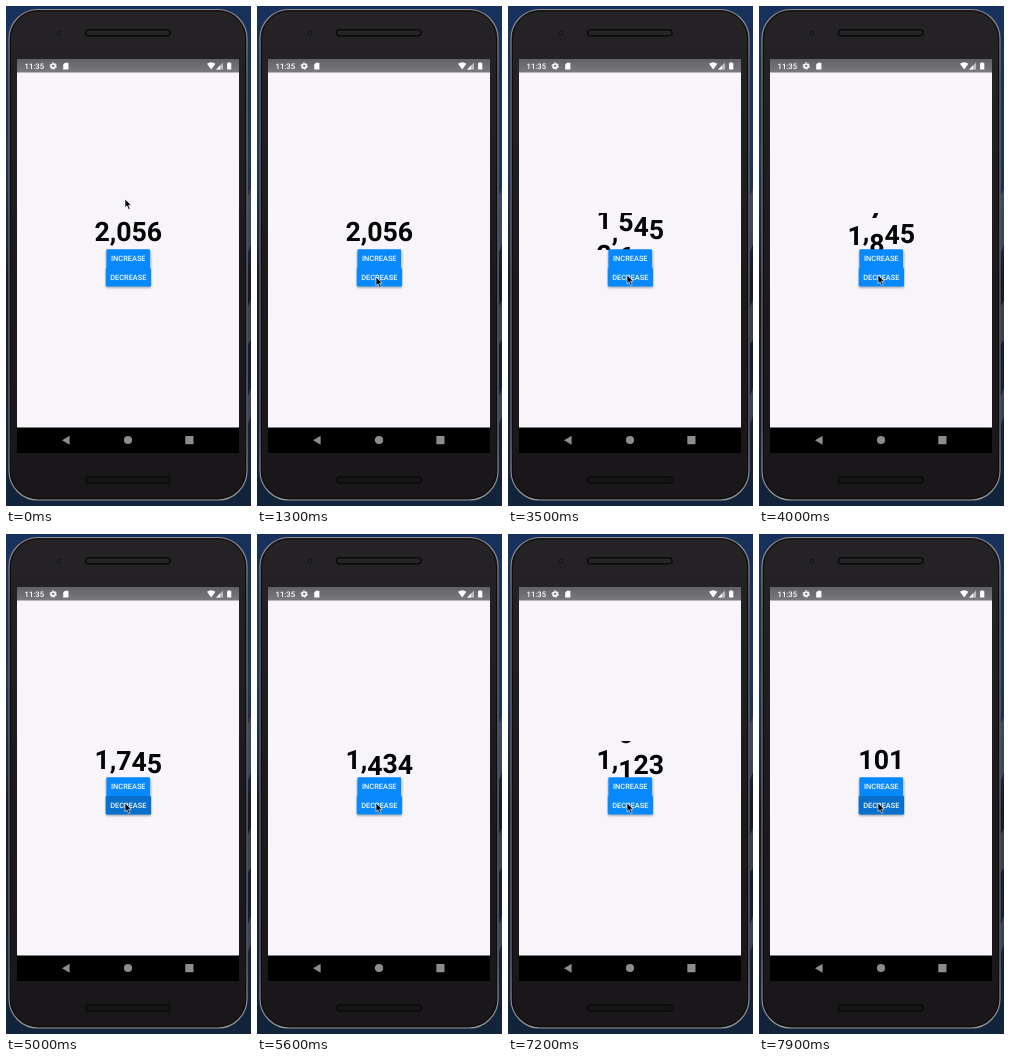
Recreate the animation shown at these times as an HTML page. Size 245 by 500 pixels, loop 8 s.

```html
<!DOCTYPE html>
<html lang="en">
<head>
<meta charset="utf-8">
<title>Animated number</title>
<style>
  html, body { margin: 0; width: 100%; height: 100%; overflow: hidden; background: #142a50; }
  svg { display: block; width: 100%; height: 100%; }
  text { font-family: Roboto, Arial, sans-serif; text-rendering: geometricPrecision; }
  .digits { font-size: 26.7px; font-weight: 700; text-anchor: middle; fill: #050505; }
  .label { font-size: 7.4px; font-weight: 500; text-anchor: middle; fill: #f4faff; }
</style>
</head>
<body>
<svg viewBox="0 0 245 500" preserveAspectRatio="none">
  <defs>
    <linearGradient id="wall" x2="0" y2="1">
      <stop offset="0" stop-color="#17305c"/>
      <stop offset=".3" stop-color="#1c355f"/>
      <stop offset=".48" stop-color="#18263f"/>
      <stop offset=".55" stop-color="#141a26"/>
      <stop offset=".8" stop-color="#14213a"/>
      <stop offset="1" stop-color="#12233c"/>
    </linearGradient>
    <linearGradient id="body" x2="0" y2="1">
      <stop offset="0" stop-color="#252326"/>
      <stop offset=".5" stop-color="#1c1a1c"/>
      <stop offset="1" stop-color="#191719"/>
    </linearGradient>
    <linearGradient id="rim" x2="0" y2="1">
      <stop offset="0" stop-color="#8e8c8c"/>
      <stop offset=".15" stop-color="#6e6c6c"/>
      <stop offset=".85" stop-color="#6e6c6c"/>
      <stop offset="1" stop-color="#9a9896"/>
    </linearGradient>
    <linearGradient id="bar" x2="0" y2="1">
      <stop offset="0" stop-color="#626164"/>
      <stop offset="1" stop-color="#7b797d"/>
    </linearGradient>
    <clipPath id="window"><rect x="80" y="207" width="85" height="37"/></clipPath>
    <filter id="soft" x="-20%" y="-30%" width="140%" height="180%"><feGaussianBlur stdDeviation="1"/></filter>
  </defs>

  <rect width="245" height="500" fill="url(#wall)"/>
  <path d="M242 190l3-8v56l-3 8zM242 300l3-6v40l-3 4zM242 390l3-8v28l-3 8z" fill="#5b6574" opacity=".5"/>

  <rect x="3" y="3.5" width="238" height="490.5" rx="29" fill="url(#body)" stroke="url(#rim)" stroke-width="1.2"/>
  <rect x="4.5" y="5" width="235" height="487.5" rx="27.5" fill="none" stroke="#0e0d0e"/>
  <g stroke="#0a0a0b" stroke-width="1.6">
    <rect x="79.5" y="23.7" width="84.5" height="6" rx="3" fill="#262427"/>
    <rect x="79.5" y="471" width="85" height="6" rx="3" fill="#151315"/>
  </g>
  <circle cx="53" cy="27" r="2" fill="#111114"/>
  <circle cx="53" cy="27" r=".8" fill="#454a54"/>

  <rect x="11" y="53" width="222" height="394" fill="#000"/>
  <rect x="11" y="66" width="222" height="355.5" fill="#f8f5fa"/>
  <rect x="11" y="53" width="222" height="13.5" fill="url(#bar)"/>

  <g fill="#fff">
    <text x="18.6" y="62.7" font-size="7.7" font-weight="500">11:35</text>
    <circle cx="47.2" cy="60" r="2" fill="none" stroke="#fff" stroke-width="1.7"/>
    <circle cx="47.2" cy="60" r="3.2" fill="none" stroke="#fff" stroke-width="1" stroke-dasharray="1.7 1.65"/>
    <path d="M59 56.7h3.4v6.8h-5.2v-5z"/>
    <path d="M201 57.8q4.2-3 8.4 0l-4.2 5.7z"/>
    <path d="M217 56.5v7h-6.8z" opacity=".55"/>
    <path d="M214 59.6v3.9h-3.8z"/>
    <path d="M222.3 56.3h1.8v.8h1.2v6.4h-4.2v-6.4h1.2z"/>
  </g>
  <g fill="#8c8c8c">
    <path d="M56 434.2l7.6-4.5v9z"/>
    <circle cx="122" cy="434" r="4.1"/>
    <rect x="179.3" y="430" width="8.2" height="8.2" rx=".6"/>
  </g>

  <g id="number" class="digits" clip-path="url(#window)"></g>

  <rect x="100" y="245" width="45" height="37" fill="#5d6570" opacity=".5" filter="url(#soft)"/>
  <rect x="100.4" y="243.3" width="43.6" height="19" rx="1" fill="#0789fb"/>
  <rect x="99.7" y="262" width="45.4" height="18.6" rx="1" fill="#0789fb"/>
  <rect id="ripple" x="99.7" y="262" width="45.4" height="18.6" rx="1" fill="#0a4a86" opacity="0"/>
  <text class="label" x="122.3" y="255.4">INCREASE</text>
  <text class="label" x="122.3" y="274.1">DECREASE</text>

  <path id="cursor" d="M0 0V8.6L2 6.8 3.6 10.4 5.2 9.7 3.6 6.2H6.3Z" fill="#0a0a0a" stroke="#fff" stroke-width=".6"/>
</svg>
<script>
const LOOP = 8000, DURATION = 1400, LAG = 50;
const CENTER = 122.3, BASELINE = 235.4, PITCH = 35.4, DIGIT_W = 15.35, COMMA_W = 6.4;
const START = 2056, STEP = 311;
const clicks = [2955, 4870, 6435, 7880];

const number = document.getElementById('number');
const ripple = document.getElementById('ripple');
const cursor = document.getElementById('cursor');

const clamp = v => Math.min(1, Math.max(0, v));
const smooth = v => v * v * (3 - 2 * v);
const elastic = t => 1 - Math.cos(t * Math.PI / 2) ** 3 * Math.cos(t * 1.2 * Math.PI);
const chars = n => [...n.toLocaleString('en-US')];
const glyph = (c, x, y) => `<text x="${x.toFixed(2)}" y="${y.toFixed(2)}">${c}</text>`;

// Digits visible in one rolling column at a fractional position
function column(x, pos) {
  let out = '';
  for (let d = Math.max(0, Math.floor(pos) - 1); d <= Math.min(9, Math.ceil(pos) + 1); d++)
    out += glyph(d, x, BASELINE + (d - pos) * PITCH);
  return out;
}

function drawNumber(t) {
  const count = clicks.filter(c => t >= c).length;
  const value = START - STEP * count;
  const next = chars(value);
  const prev = count ? chars(value + STEP) : next;
  const since = count ? t - clicks[count - 1] : DURATION;
  const widths = next.map(c => c === ',' ? COMMA_W : DIGIT_W);
  let x = CENTER - widths.reduce((a, b) => a + b) / 2;
  // Columns pair up from the left; the rightmost starts first
  number.innerHTML = next.map((c, i) => {
    const mid = x + widths[i] / 2;
    x += widths[i];
    if (c === ',') return glyph(c, mid, BASELINE);
    const from = Number(prev[i]) || 0;
    const order = next.slice(i + 1).filter(d => d !== ',').length;
    const k = elastic(clamp((since - LAG * order) / DURATION));
    return column(mid, from + (c - from) * k);
  }).join('');
}

function drawRipple(t) {
  const press = clicks.find(c => t >= c - 45 && t < c + 400);
  ripple.setAttribute('opacity', press ? 0.42 * (1 - clamp((t - press - 190) / 200)) : 0);
}

function drawCursor(t) {
  const stops = [[100, 193], [950, 264], [1500, 274], [1900, 269]];
  let y = stops[0][1];
  for (let i = 1; i < stops.length; i++) {
    const [t0, y0] = stops[i - 1], [t1, y1] = stops[i];
    y += (y1 - y0) * smooth(clamp((t - t0) / (t1 - t0)));
  }
  cursor.setAttribute('transform', `translate(119 ${y.toFixed(2)})`);
}

function render(t) {
  drawNumber(t);
  drawRipple(t);
  drawCursor(t);
}

const begin = performance.now();
function frame() {
  render((performance.now() - begin) % LOOP);
  requestAnimationFrame(frame);
}
render(0);
requestAnimationFrame(frame);
</script>
</body>
</html>
```
